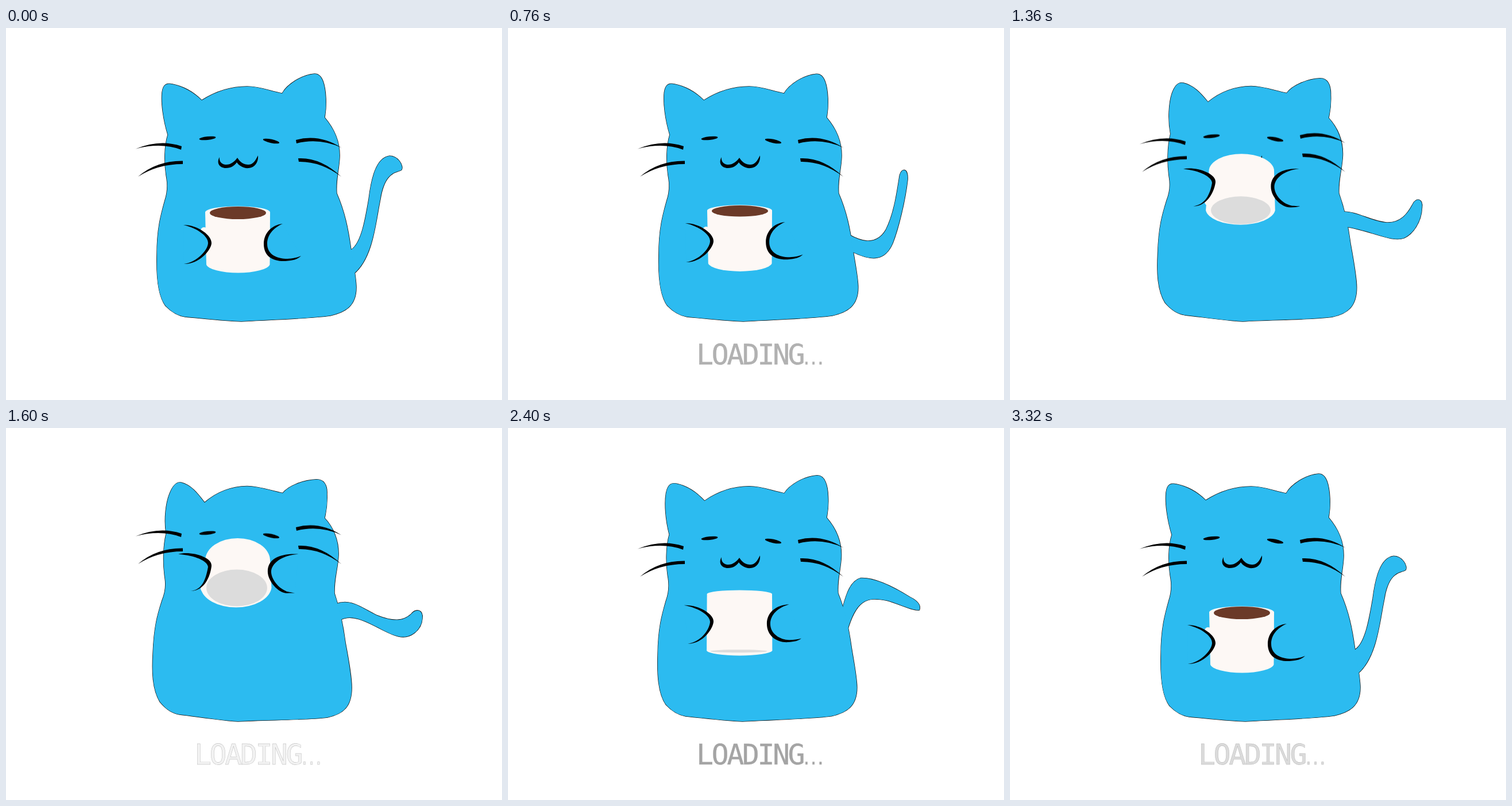
Write an HTML page without scripts that moves like this. It is 864x648 px and loops after 3.36 s.

```html
<!DOCTYPE html>
<html lang="en">
<head>
<meta charset="utf-8">
<title>Loading cat</title>
<style>
html, body { margin: 0; width: 100%; height: 100%; overflow: hidden; background: #fff; }
svg { display: block; width: 864px; height: 648px; }

.skin { fill: #2cbbf0; }
.edge { fill: #111; stroke: #111; stroke-width: 1.5; stroke-linejoin: round; }
.china { fill: #fdf8f5; }

/* The sip rises and falls symmetrically, so it runs back and forth. */
.sip { animation: 1.68s linear -3.33s infinite alternate; }
.body { animation-name: body; }
.head { animation-name: head; }
.eyes { animation-name: eyes; }
.cup { animation-name: cup; }
.coffee { animation-name: coffee; }
.base { animation-name: base; }
.handle { animation-name: handle; }
.palm-l { animation-name: palm-l; }
.palm-r { animation-name: palm-r; }
.paw-l { animation-name: paw-l; }
.paw-r { animation-name: paw-r; }
.tail { animation: tail 3.36s linear infinite; }
.label { animation: show 3.36s step-end infinite, fade 3.36s linear infinite; }

@keyframes body {
  0%, 37.5% {
    d: path("M341,126 C366,110 392,102 420,102 C442,102 460,110 481,114 C490,98 515,82 537,80 C552,79 556,102 557,122 C558,140 556,148 555,156 C572,176 582,198 581,225 C580,248 574,265 576,288 C590,320 596,350 601,386 C605,412 610,436 610,452 C610,485 590,495 565,501 C530,506 460,508 410,511 C380,510 345,506 312,503 C298,501 288,494 278,484 C264,465 262,430 263,395 C263,350 270,325 277,300 C281,288 282,275 280,262 C275,235 276,205 282,186 C274,160 270,130 272,112 C274,97 281,96 290,98 C310,102 328,113 341,126 Z");
    animation-timing-function: cubic-bezier(.37, 0, .63, 1);
  }
  98.2%, 100% {
    d: path("M346,130 C368,111 392,102 420,101.5 C442,102 460,109 482,113.5 C492,101 517,91 541,90 C553,90 560,98 559,115 C560,137 557,146 555,157 C570,173 580,196 579,222 C578,245 571,263 572,288 C582,318 588,350 591,374 C596,400 602,436 602,452 C602,485 588,498 560,504 C520,509 455,508 404,511 C372,509 335,503 302,499 C288,497 278,489 268,477 C255,455 254,425 256,392 C258,345 264,325 272,300 C277,288 279,275 277,262 C273,235 274,205 279,184 C275,158 279,130 285,115 C292,97 299,94 305,95 C322,99 333,113 346,130 Z");
  }
}
@keyframes head {
  0%, 66.1% { transform: translateY(0); animation-timing-function: cubic-bezier(.37, 0, .63, 1); }
  98.2%, 100% { transform: translateY(-23.3px); }
}
@keyframes eyes {
  0%, 66.1% { transform: translateY(0); animation-timing-function: cubic-bezier(.37, 0, .63, 1); }
  98.2%, 100% { transform: translateY(-9.7px); }
}
@keyframes cup {
  0%, 37.5% { d: path("M347,321 A56.5,10.5 0 0 1 460,321 L459.5,412 A55.5,16 0 0 1 349,412 Z"); animation-timing-function: cubic-bezier(.333, 0, .667, .333); }
  55.4% { d: path("M346.7,294 A56.7,4 0 0 1 460,294 L460,395 A57,10 0 0 1 347,395 Z"); }
  64.9% { d: path("M346.5,280 A57,12 0 0 1 460,280 L461,376 A58.5,8.5 0 0 1 344.5,376 Z"); }
  75.4% { d: path("M346.5,255 A57,26 0 0 1 460,255 L461.5,336 A60,23 0 0 1 342,336 Z"); animation-timing-function: cubic-bezier(.333, .667, .667, 1); }
  98.2%, 100% { d: path("M347,229 A56.5,39.5 0 0 1 460,229 L462.5,276 A62,38 0 0 1 339,276 Z"); }
}
@keyframes coffee {
  0%, 37.5% { cy: 322px; ry: 11px; animation-timing-function: cubic-bezier(.333, 0, .667, .333); }
  55.4%, 100% { cy: 294px; ry: 0px; }
}
@keyframes base {
  0%, 55.4% { cy: 396px; rx: 49px; ry: 0px; }
  64.9% { cy: 376px; rx: 50px; ry: 7px; }
  75.4% { cy: 336px; rx: 51.5px; ry: 20.5px; animation-timing-function: cubic-bezier(.333, .667, .667, 1); }
  98.2%, 100% { cy: 276px; rx: 53px; ry: 32.5px; }
}
@keyframes handle {
  0%, 37.5% { cy: 353px; }
  64.9% { cy: 349px; }
  75.4% { cy: 314px; animation-timing-function: cubic-bezier(.333, .667, .667, 1); }
  98.2%, 100% { cy: 278px; }
}
@keyframes palm-l {
  0%, 37.5% { d: path("M309,344 C335,345 356,363 355,375 C354,388 333,410 310,410 Z"); animation-timing-function: cubic-bezier(.37, 0, .63, 1); }
  98.2%, 100% { d: path("M300,218 C320,214 356,224 355,239 C354,250 347,281 322,282 Z"); }
}
@keyframes paw-l {
  0%, 37.5% { d: path("M309,343 C335,343 359,362 358,375 C357,388 335,412 310,411 C332,408 351,388 352,375 C353,364 335,349 309,343 Z"); animation-timing-function: cubic-bezier(.37, 0, .63, 1); }
  98.2%, 100% { d: path("M300,218 C320,212 359,222 358,238 C357,250 349,282 322,282 C342,280 348,262 352,240 C351,230 330,220 300,218 Z"); }
}
@keyframes palm-r {
  0%, 37.5% { d: path("M482,341 C464,345 452,359 452,376 C452,395 466,404 487,404 L514,397 Z"); animation-timing-function: cubic-bezier(.37, 0, .63, 1); }
  98.2%, 100% { d: path("M510,218 C479,218 459,230 459,248 C459,264 475,282 489,284 L503,286 Z"); }
}
@keyframes paw-r {
  0%, 37.5% { d: path("M482,341 C462,343 449,358 449,376 C449,398 465,407 487,406 C500,405 508,403 514,397 C505,401 495,402 487,402 C468,401 455,392 455,376 C455,360 466,348 482,341 Z"); animation-timing-function: cubic-bezier(.37, 0, .63, 1); }
  98.2%, 100% { d: path("M510,218 C478,216 456,226 456,248 C456,266 476,287 490,286 C495,286 499,286 503,286 C495,284 490,284 487,282 C475,277 462,262 462,248 C463,234 480,220 510,218 Z"); }
}
@keyframes tail {
  0%, 100% { d: path("M598,388 C620,380 627,325 632,298 C636,265 644,226 668,223 C683,223 693,240 689,247 C684,252 660,246 652,298 C644,335 640,400 606,428 Z"); }
  0% { animation-timing-function: cubic-bezier(.4, 0, .75, .6); }
  22.62% { d: path("M594,360 C612,370 640,382 658,352 C672,325 677,290 682,258 C685,243 697,243 696,264 C692,300 680,350 670,375 C657,405 635,407 600,390 Z"); }
  33.33% { d: path("M586,333 C605,342 640,360 667,352 C687,342 693,310 697,290 C701,276 712,278 710,294 C709,325 699,350 690,368 C677,391 650,390 592,359 Z"); }
  47.62% { d: path("M574,307 C600,296 620,314 645,326 C675,338 692,337 706,324 C714,314 727,316 725,332 C724,352 704,368 684,363 C655,357 612,318 583,334 Z"); }
  63.1% { d: path("M575,303 C580,290 588,271 604,272 C630,276 665,296 697,308 C715,314 728,324 727,339 C722,347 690,333 670,321 C630,302 602,287 583,334 Z"); }
  82.14% {
    d: path("M589,340 C597,310 600,262 628,248 C650,240 685,255 705,278 C711,284 710,291 703,289 C685,283 670,272 646,274 C618,282 612,315 600,382 Z");
    animation-timing-function: cubic-bezier(.33, .5, .67, 1);
  }
}
@keyframes show {
  0% { opacity: 0; }
  .6% { opacity: 1; }
  33% { opacity: 0; }
  47% { opacity: 1; }
  83% { opacity: 0; }
  97%, 100% { opacity: 1; }
}
@keyframes fade {
  0%, 33%, 47%, 83%, 97% { fill-opacity: 0; }
  7.4%, 56.5% { fill-opacity: 1; }
  13.1%, 63.1% { fill-opacity: 1; animation-timing-function: cubic-bezier(.3, .4, .7, .9); }
  100% { fill-opacity: .31; }
}

text {
  font: 50px "DejaVu Sans Mono", "Liberation Mono", monospace;
  letter-spacing: -3.5px;
  fill: #404040;
  stroke: #aaa;
  stroke-width: .4;
}
.dots { font-size: 28px; letter-spacing: -4.7px; }
</style>
</head>
<body>
<svg viewBox="0 0 864 648">
  <g class="edge">
    <path class="tail"/>
    <path class="sip body"/>
  </g>
  <g class="skin">
    <path class="tail"/>
    <path class="sip body"/>
  </g>

  <g class="sip head">
    <path d="M226,210.5 Q268,193 306,206 L305,212 Q270,199 226,210.5 Z"/>
    <path d="M230,259 Q262,231 308,231.5 L308,237 Q264,237 230,259 Z"/>
    <path d="M584,208.5 Q546,184 505,195 L506,201 Q546,191 584,208.5 Z"/>
    <path d="M584,259 Q548,225 509,227 L510,233 Q548,232 584,259 Z"/>
  </g>
  <g class="sip eyes">
    <ellipse cx="351" cy="192" rx="14.5" ry="3" transform="rotate(-6 351 192)"/>
    <ellipse cx="462" cy="197" rx="14.5" ry="3.2" transform="rotate(12 462 197)"/>
  </g>
  <path d="M372,225 C366,235 372,244 383,244 C392,244 398,240 402,234 C406,240 414,245 423,244 C434,243 440,233 439,222 C434,232 430,238 422,238 C414,238 408,234 403,226 C398,233 390,239 382,238 C375,237 371,232 372,225 Z"/>

  <circle class="sip china handle" cx="345" r="6"/>
  <path class="sip china cup"/>
  <ellipse class="sip coffee" cx="404" rx="49" fill="#6b3a28"/>
  <ellipse class="sip base" cx="402" fill="#dcdcdc"/>

  <path class="sip skin palm-l"/>
  <path class="sip skin palm-r"/>
  <path class="sip paw-l"/>
  <path class="sip paw-r"/>

  <text class="label" x="328" y="585.5">LOADING<tspan class="dots" x="511.6">...</tspan></text>
</svg>
</body>
</html>
```
